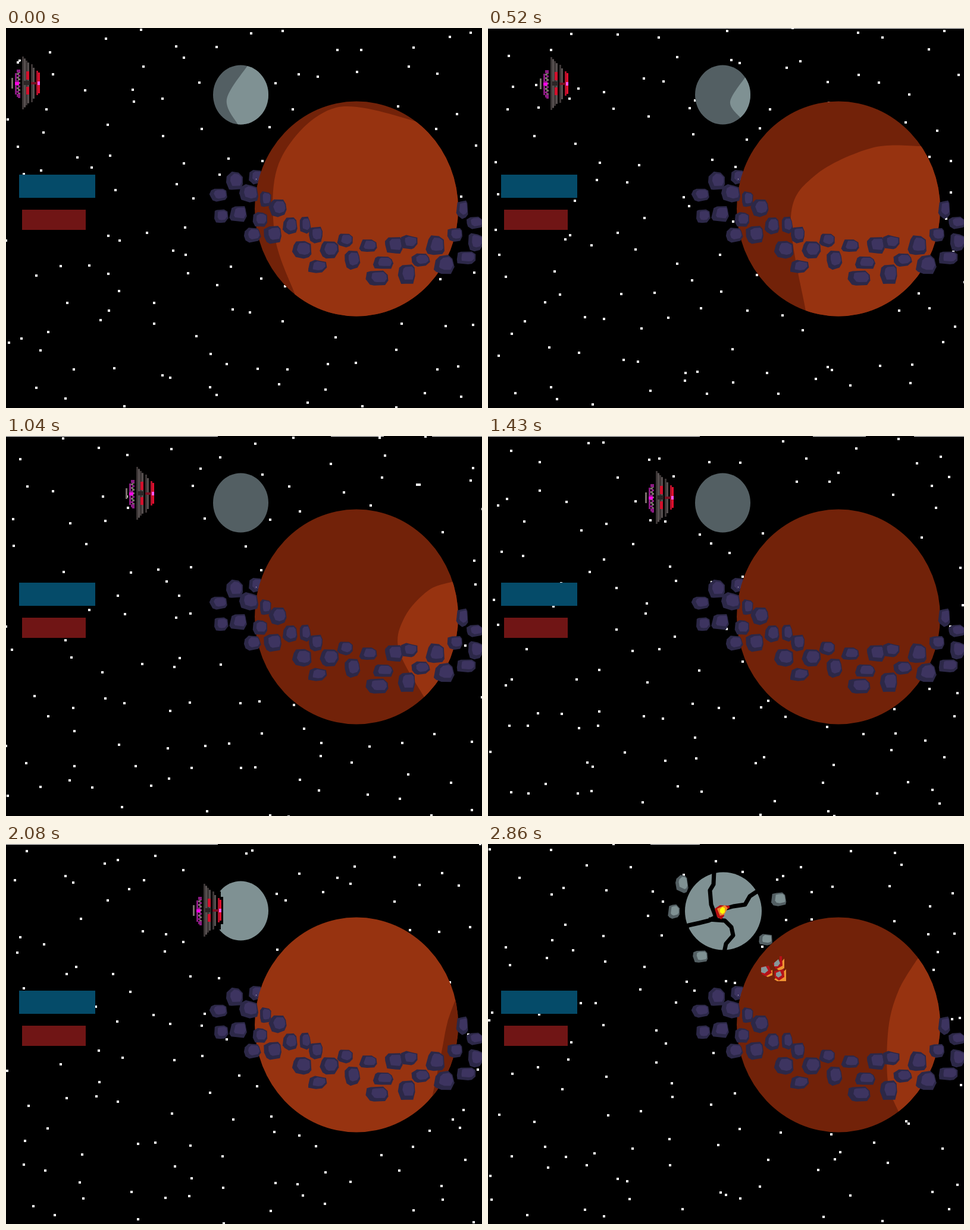
These frames come from a looping animation (800 by 640 pixels, 2990 ms). An HTML page with a canvas:

```html
<!DOCTYPE html>
<html lang="en">
<head>
<meta charset="utf-8">
<title>Planet and moon</title>
<style>
html, body { margin: 0; width: 100%; height: 100%; overflow: hidden; background: #000; }
canvas { display: block; }
</style>
</head>
<body>
<canvas id="stage" width="800" height="640"></canvas>
<script>
const ctx = document.getElementById('stage').getContext('2d');
const STEP = 130, STEPS = 23;
const PLANET = { x: 589, y: 304.5, rx: 171, ry: 181, lit: '#973310', dark: '#722209' };
const MOON = { x: 394.5, y: 112.5, rx: 46.5, ry: 50, lit: '#7f9193', dark: '#535f63' };

// Keys are [step, ...values]; terminators list points from top to bottom.
const PLANET_DUSK = [
  [0, 700,160, 555,134, 462,220, 451,345, 485,447],
  [4, 728,199, 645,202, 550,248, 509,318, 534,476],
  [8, 752,245, 710,260, 670,305, 660,360, 703,440],
  [11, 800,250, 790,270, 775,310, 770,360, 800,440]];
const PLANET_DAWN = [
  [12, 480,150, 440,220, 425,300, 435,370, 470,450],
  [16, 757,258, 742,300, 734,340, 726,380, 715,432],
  [17, 810,258, 800,300, 790,340, 785,380, 780,432]];
const PLANET_DUSK_2 = [
  [18, 500,110, 440,170, 415,260, 415,360, 480,450],
  [20, 585,123, 545,185, 514,280, 514,390, 560,484],
  [22, 722,193, 690,247, 673,310, 672,400, 690,451]];
const MOON_DUSK = [
  [0, 407,62, 371,120, 390,163],
  [4, 433,82, 407,124, 424,151],
  [7, 460,82, 445,124, 455,151]];
const MOON_DAWN = [[12, 360,62, 352,112, 358,163], [16, 460,62, 445,112, 455,163]];
const MOON_DUSK_2 = [[18, 350,62, 345,112, 350,163], [20, 405,62, 392,112, 400,163]];
const SHIP_PATH = [[0, 9,48], [4, 87,49], [8, 201,52], [11, 264,59], [16, 314,67], [18, 334,69]];

const ASTEROIDS = [
  [384,258,27,30], [408,279,32,30], [357,281,29,22], [361,317,24,22], [391,313,30,28],
  [414,349,29,26], [427,323,24,24], [436,288,20,26], [457,304,30,30], [449,348,31,29],
  [477,333,25,27], [503,332,18,27], [521,348,24,27], [497,374,31,30], [523,402,32,22],
  [543,374,30,30], [570,357,26,23], [582,391,27,32], [609,367,29,22], [624,421,39,25],
  [634,395,33,23], [652,366,31,29], [677,361,30,23], [674,415,30,33], [697,391,32,22],
  [722,367,31,34], [737,399,34,33], [755,348,27,22], [767,306,19,31], [773,387,31,24],
  [788,328,30,21], [789,361,27,30]];

function rand(n) {
  const v = Math.sin(n * 12.9898 + 4.137) * 43758.5453;
  return v - Math.floor(v);
}

function rect(color, x, y, w, h) {
  ctx.fillStyle = color;
  ctx.fillRect(x, y, w, h);
}

function fill(color, path) {
  ctx.fillStyle = color;
  ctx.fill(new Path2D(path));
}

function oval(color, x, y, rx, ry = rx) {
  ctx.fillStyle = color;
  ctx.beginPath();
  ctx.ellipse(x, y, rx, ry, 0, 0, 7);
  ctx.fill();
}

function valuesAt(keys, step) {
  let i = 0;
  while (i < keys.length - 2 && step > keys[i + 1][0]) i++;
  const [a, b] = [keys[i], keys[i + 1]];
  const k = Math.max(0, Math.min(1, (step - a[0]) / (b[0] - a[0])));
  return a.slice(1).map((v, n) => v + (b[n + 1] - v) * k);
}

// Fills everything to the right of a smooth curve.
function fillRightOf(flat, color) {
  const p = [];
  for (let i = 0; i < flat.length; i += 2) p.push([flat[i], flat[i + 1]]);
  const at = i => p[Math.max(0, Math.min(p.length - 1, i))];
  const handle = (i, sign) => [0, 1].map(n => at(i)[n] + sign * (at(i + 1)[n] - at(i - 1)[n]) / 6);
  ctx.beginPath();
  ctx.moveTo(...p[0]);
  for (let i = 1; i < p.length; i++) {
    ctx.bezierCurveTo(...handle(i - 1, 1), ...handle(i, -1), ...p[i]);
  }
  ctx.lineTo(p[p.length - 1][0], 640);
  ctx.lineTo(900, 640);
  ctx.lineTo(900, p[0][1]);
  ctx.fillStyle = color;
  ctx.fill();
}

function globe(body, step, dusk, dawn, dusk2) {
  const rising = step >= 12 && step < 18;
  const keys = rising ? dawn : step < 12 ? dusk : dusk2;
  ctx.save();
  oval(rising ? body.lit : body.dark, body.x, body.y, body.rx, body.ry);
  ctx.clip();
  fillRightOf(valuesAt(keys, step), rising ? body.dark : body.lit);
  ctx.restore();
}

function rock(x, y, w, h, outer = '#2c2848', inner = '#3d3460') {
  const squarish = v => Math.sign(v) * Math.abs(v) ** 0.7;
  const outline = (cx, cy, scale) => {
    ctx.beginPath();
    for (let i = 0; i < 9; i++) {
      const angle = (i + 0.6 * rand(x + i * 7)) * Math.PI * 2 / 9;
      const r = scale * (0.45 + 0.1 * rand(y + i * 3));
      ctx.lineTo(cx + squarish(Math.cos(angle)) * r * w, cy + squarish(Math.sin(angle)) * r * h);
    }
    ctx.fill();
  };
  ctx.fillStyle = outer;
  outline(x, y, 1);
  ctx.fillStyle = inner;
  outline(x + w * 0.09, y - h * 0.06, 0.68);
}

function stars(step) {
  for (let i = 0; i < 154; i++) {
    const seed = i * 5.3 + (step > 20 && i % 2 ? 20 : step) * 977;
    const x = (i % 14 + rand(seed)) * 58 - 4;
    const y = (Math.floor(i / 14) + rand(seed + 1.7)) * 59 - 4;
    rect('#fff', Math.round(x), Math.round(y), 4, 4);
  }
}

function topLine(step) {
  const spans = step < 1 ? [] : step < 6 ? [[0, 800]]
    : step < 14 ? [[0, 356], [546, 635], [716, 800]]
    : step < 18 ? [[0, 356]] : [[273, 356]];
  for (const [from, to] of spans) rect('#fff', from, 0, to - from, 1);
}

function ship(step) {
  const [x, y] = valuesAt(SHIP_PATH, step).map(Math.round);
  ctx.save();
  ctx.translate(x, y);
  rect('#000', 15, 8, 27, 74);
  rect('#000', 33, 13, 14, 64);
  rect('#000', 42, 22, 9, 46);
  rect('#777068', 0, 36, 3, 18);
  rect('#8b1a82', 6, 28, 3, 36);
  for (let i = 0; i < 16; i++) rect(i % 3 ? '#777068' : '#8b1a82', 9 + i % 2 * 2, 22 + i * 3, 4, 3);
  rect('#8b1a82', 9, 22, 6, 5);
  rect('#8b1a82', 9, 63, 6, 5);
  rect('#ff00e6', 6, 43, 7, 5);
  for (let i = 0; i < 4; i++) rect(i % 2 ? '#575050' : '#3c3636', 18 + i * 3, i * 3.4, 3, 89 - i * 6.8);
  rect('#d2102c', 25, 25, 5, 14);
  rect('#d2102c', 25, 51, 5, 13);
  rect('#2c2626', 21, 41, 10, 7);
  rect('#3c3636', 33, 13, 3, 64);
  rect('#575050', 36, 19, 3, 52);
  rect('#000', 48, 25, 3, 40);
  rect('#b3102a', 42, 24, 3, 41);
  rect('#e00f2e', 45, 27, 3, 35);
  rect('#7a1022', 33, 43, 10, 4);
  rect('#ff55ff', 44, 42, 4, 6);
  ctx.restore();
}

// A quarter-turned cross of armour gripping the moon.
function grip() {
  ctx.save();
  ctx.beginPath();
  ctx.ellipse(MOON.x, MOON.y, MOON.rx, MOON.ry, 0, 0, 7);
  ctx.clip();
  fill('#ad1230', 'M381 62H406Q411 95 442 101V125Q413 132 407 163H383Q376 136 347 129V99Q376 93 381 62Z');
  fill('#8a1a30', 'M386 62H402Q405 98 442 106V120Q408 127 402 163H387Q381 130 347 123V105Q381 99 386 62Z');
  ctx.strokeStyle = '#302a2c';
  ctx.lineWidth = 2;
  for (const arm of [
    'M391 61H397Q405 88 402 113Q405 138 397 164H391Q383 138 386 113Q383 88 391 61Z',
    'M346 111Q372 103 394 106Q417 103 443 110V117Q417 124 394 121Q372 124 346 116Z']) {
    fill('#574f50', arm);
    ctx.stroke(new Path2D(arm));
  }
  fill('#574f50', 'M387 106H401V121H387Z');
  ctx.restore();
  oval('#b3102a', 394, 114, 10.5);
  oval('#e00628', 394, 114, 8.5);
}

function brokenMoon(step) {
  ctx.save();
  if (step < 22) {
    ctx.translate(396, 113);
    ctx.scale(0.85, 0.85);
    ctx.translate(-396, -113);
  }
  oval(MOON.lit, 395.5, 113, 64.5, 65.5);
  ctx.strokeStyle = '#000';
  ctx.lineWidth = 7;
  ctx.lineJoin = 'round';
  ctx.stroke(new Path2D('M380 46L379 68L373 78L375 102L383 123L371 129L355 133L337 137L330 143'
    + 'M371 127L398 129L409 140L412 154L400 168L397 182'
    + 'M394 110L412 105L432 102L440 88L458 76'));
  fill('#b80f12', 'M381 109L390 103L406 104V108L396 112L397 121L392 127L385 123Z');
  fill('#ed8b2c', 'M385 109L398 103L403 108L397 119L390 121Z');
  fill('#ffff00', 'M390 110L394 106L398 108V115L394 118L390 115Z');
  for (const [x, y, w, h] of [[326,67,22,30], [312,114,19,25], [357,190,27,21], [467,161,22,20], [489,93,26,22]]) {
    rock(x, y, w, h, MOON.dark, MOON.lit);
  }
  ctx.restore();
}

function impacts() {
  fill('#ef9432', 'M463 220L478 212V221L470 224ZM484 209L498 193V209L490 214ZM481 228L501 211V231H486Z');
  fill('#b51218', 'M459 207L472 205L477 217L467 223L460 219ZM478 201L490 197V189H494L495 205L484 211ZM481 214L497 211L498 224L489 230L482 225Z');
  fill('#87979a', 'M459 208L467 206L471 213L465 218L459 216ZM481 200L488 194L491 201L487 206H481ZM484 217L491 214L494 221L488 225L484 222Z');
}

function draw(step) {
  rect('#000', 0, 0, 800, 640);
  stars(step);
  topLine(step);
  rect('#054b69', 22, 247, 128, 39);
  rect('#701515', 27, 306, 107, 34);
  rock(420, 251, 23, 24);
  rect('#fff', 420, 254, 1, 1);
  globe(PLANET, step, PLANET_DUSK, PLANET_DAWN, PLANET_DUSK_2);
  for (const a of ASTEROIDS) rock(...a);
  if (step > 20) brokenMoon(step);
  else globe(MOON, step, MOON_DUSK, MOON_DAWN, MOON_DUSK_2);
  if (step < 19) ship(step);
  else if (step < 21) grip();
  if (step === 22) impacts();
}

function tick() {
  draw(Math.floor(performance.now() / STEP) % STEPS);
  requestAnimationFrame(tick);
}
tick();
</script>
</body>
</html>
```
